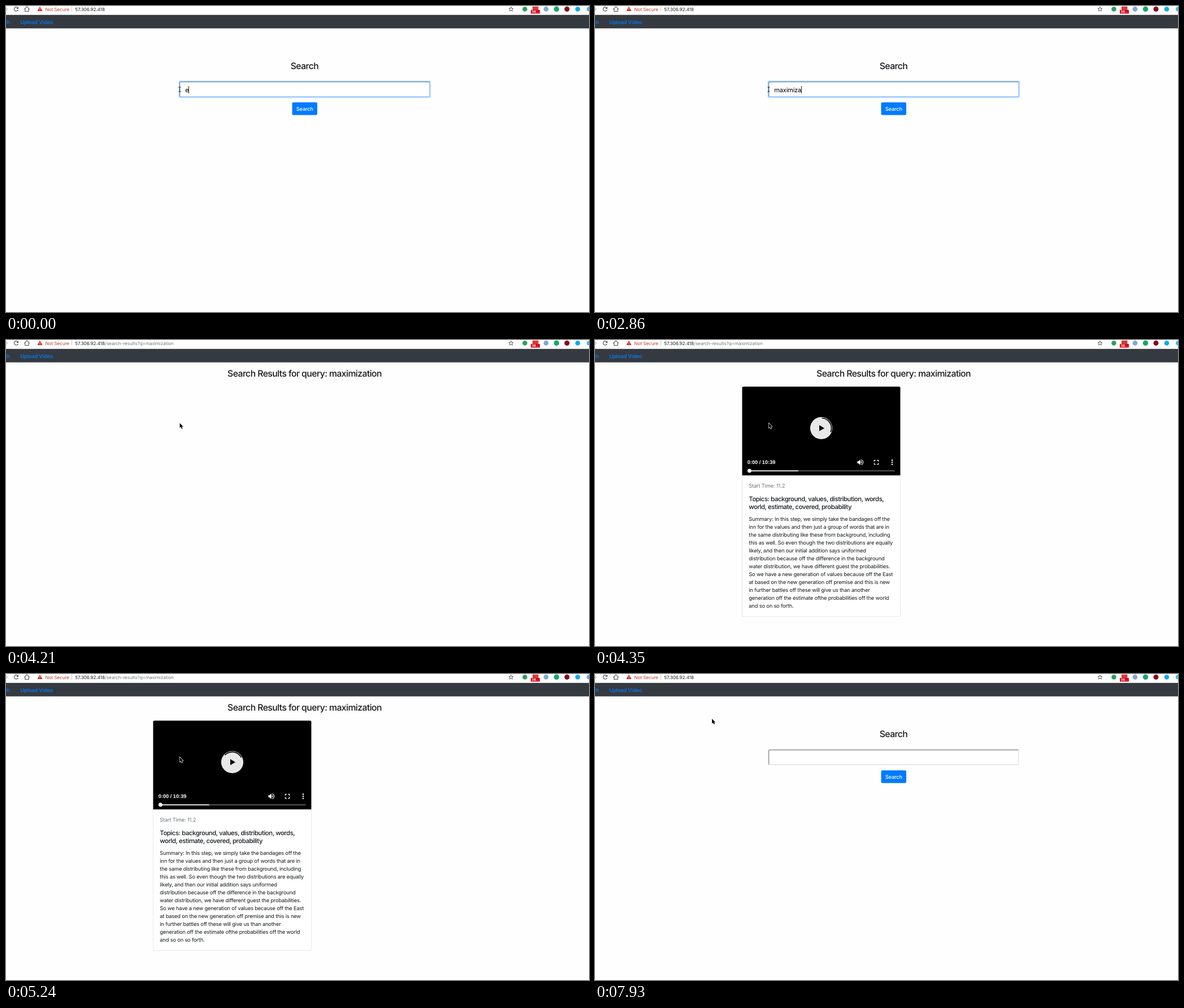
Recreate the animation shown at these times as an HTML page with a canvas. Size 1032 px wide and 543 px high, loop 8 s.

```html
<!DOCTYPE html>
<html lang="en">
<head>
<meta charset="utf-8">
<title>Video search</title>
<style>
  html, body { margin: 0; width: 100%; height: 100%; overflow: hidden; background: #fefefe; }
  canvas { display: block; width: 1032px; height: 543px; }
</style>
</head>
<body>
<canvas id="stage"></canvas>
<script>
const W = 1032, H = 543, LOOP = 8000;
const canvas = document.getElementById('stage');
const ctx = canvas.getContext('2d');
const dpr = window.devicePixelRatio || 1;
canvas.width = W * dpr;
canvas.height = H * dpr;

const HOST = '57.306.92.418';
const QUERY = 'maximization';
const BLUE = '#007bff', INK = '#16191c';

// Text styles: size, weight, tracking in em, family
const SANS = 'Inter, sans-serif';
const STYLE = {
  url: [8.17, 400, -0.009, SANS],
  nav: [9.33, 500, -0.02, SANS],
  body: [9.33, 400, -0.02, SANS],
  title: [15.8, 500, -0.037, SANS],
  topic: [11.32, 500, -0.037, SANS],
  input: [11.15, 400, -0.02, SANS],
  clock: [9.2, 700, 0, '"Liberation Sans", sans-serif'],
  badge: [5.8, 700, 0, SANS]
};

const SUMMARY = [
  'Summary: In this step, we simply take the bandages off the',
  'inn for the values and then just a group of words that are in',
  'the same distributing like these from background, including',
  'this as well. So even though the two distributions are equally',
  'likely, and then our initial addition says uniformed',
  'distribution because off the difference in the background',
  'water distribution, we have different guest the probabilities.',
  'So we have a new generation of values because off the East',
  'at based on the new generation off premise and this is new',
  'in further battles off these will give us than another',
  'generation off the estimate ofthe probabilities off the world',
  'and so on so forth.'
];

// [start ms, contents of the search field]
const TYPING = [
  [0, 'e'], [300, 'ex'], [780, 'e'], [930, ''], [1080, 'm'], [1230, 'ma'],
  [1370, 'mai'], [1520, 'maix'], [1810, 'mai'], [1960, 'ma'], [2110, 'max'],
  [2260, 'maxi'], [2560, 'maxim'], [2710, 'maximiz'], [2860, 'maximiza'],
  [3160, 'maximizati'], [3310, 'maximizatio'], [3760, QUERY]
];

// [start ms, x, y] of the arrow on the results page
const POINTER = [
  [4210, 307, 147], [5390, 174, 120], [5540, 41, 93], [5690, -40, 70],
  [5990, -1, 43], [6135, -2, 32], [6280, -40, 28]
];

const T_RESULTS = 4210, T_CARD = 4350, T_LOADED = 5390, T_HOVER = 6135, T_BACK = 7930;

function at(list, t) {
  let hit = list[0];
  for (const row of list) if (row[0] <= t) hit = row;
  return hit;
}

function text(str, x, y, style, color, align = 'left') {
  const [size, weight, track, family] = STYLE[style];
  ctx.font = `${weight} ${size}px ${family}`;
  ctx.letterSpacing = `${size * track}px`;
  ctx.textRendering = 'geometricPrecision';
  ctx.textAlign = align;
  ctx.fillStyle = color;
  ctx.fillText(str, x, y);
  return ctx.measureText(str).width;
}

function rect(x, y, w, h, color) {
  ctx.fillStyle = color;
  ctx.fillRect(x, y, w, h);
}

function round(x, y, w, h, r, color) {
  ctx.beginPath();
  ctx.roundRect(x, y, w, h, r);
  ctx.fillStyle = color;
  ctx.fill();
}

function disc(x, y, r, color) {
  ctx.beginPath();
  ctx.arc(x, y, r, 0, Math.PI * 2);
  ctx.fillStyle = color;
  ctx.fill();
}

function path(points, close) {
  ctx.beginPath();
  points.forEach(([x, y]) => ctx.lineTo(x, y));
  if (close) ctx.closePath();
}

function fillPath(points, color) {
  path(points, true);
  ctx.fillStyle = color;
  ctx.fill();
}

function stroke(color, width) {
  ctx.strokeStyle = color;
  ctx.lineWidth = width;
  ctx.stroke();
}

function toolbar(results) {
  const gray = '#4c4f53';
  rect(0, 0, W, 16, '#fff');

  path([[-1, 2], [2.5, 5.5], [-1, 9]]);
  stroke('#b8babd', 1.1);

  ctx.beginPath();
  ctx.arc(18, 5.5, 3.5, 0.35, 5.4);
  stroke(gray, 1.2);
  fillPath([[22, 1.2], [22, 5], [18.2, 5]], gray);

  path([[32.3, 5.8], [37, 1.2], [41.7, 5.8]]);
  stroke(gray, 1.1);
  path([[33.8, 5], [33.8, 9.5], [40.2, 9.5], [40.2, 5]]);
  stroke(gray, 1.1);

  fillPath([[60, 1], [64.5, 9], [55.5, 9]], '#c5281c');
  rect(59.5, 3.8, 1, 2.6, '#fff');
  rect(59.5, 7, 1, 1, '#fff');
  text('Not Secure', 69.5, 8.5, 'url', '#c5392b');
  rect(116, 1, 1, 9, '#c4c6c8');

  const w = text(HOST, 122.3, 8.5, 'url', '#202124');
  if (results) text('/search-results?q=' + QUERY, 122.3 + w, 8.5, 'url', '#72767b');

  const star = [];
  for (let i = 0; i < 10; i++) {
    const r = i % 2 ? 1.8 : 4.2, a = i * Math.PI / 5 - Math.PI / 2;
    star.push([894 + r * Math.cos(a), 5.8 + r * Math.sin(a)]);
  }
  path(star, true);
  stroke(gray, 0.9);

  disc(918.5, 5.5, 4.3, '#2c9f5c');
  rect(932, 1, 10.5, 7, '#d93a35');
  rect(929, 7, 16, 6.5, '#d5081c');
  text('38...', 937, 12.4, 'badge', '#fff', 'center');
  disc(956, 5.5, 4.4, '#82a8d3');
  disc(974.5, 5.5, 4.7, '#0fa968');
  disc(993, 5.5, 4.5, '#850b1b');
  disc(1012, 5.5, 4.3, '#10a9e8');
  disc(1032, 5.5, 4, '#45b8e8');
}

function navbar(hover) {
  rect(0, 15.4, W, 0.6, '#b6b6b6');
  rect(0, 16, W, 23.7, '#343a40');
  text('Search', 7, 31.5, 'nav', hover ? '#0056b3' : BLUE, 'right');
  text('Upload Video', 25.3, 31.5, 'nav', BLUE);
}

function field(focused) {
  const x = 307, y = 134, w = 443.5, h = 27.5;
  if (focused) round(x - 1.7, y - 1.7, w + 3.4, h + 3.4, 3.5, '#bfdeff');
  round(x, y, w, h, 2.3, focused ? '#80bdff' : '#dedede');

  // Inset border: darker on the top and left
  ctx.save();
  path([[x, y], [x + w, y], [x + w - 2, y + 2], [x + 2, y + h - 2], [x, y + h]], true);
  ctx.clip();
  round(x, y, w, h, 2.3, focused ? '#5686bd' : '#7d7d7d');
  ctx.restore();
  round(x + 1.2, y + 1.2, w - 2.4, h - 2.4, 1.4, '#fff');
}

function searchPage(t) {
  const focused = t < T_BACK;
  text('Search', 528.5, 111.6, 'title', INK, 'center');
  field(focused);
  if (focused) {
    const w = text(at(TYPING, t)[1], 317.2, 152.5, 'input', '#000');
    rect(Math.round(317 + w), 142, 1, 13, '#222');
  }
  round(506.5, 171, 44.5, 22.5, 2.3, BLUE);
  text('Search', 528.8, 185.9, 'nav', '#fff', 'center');
}

function player(t) {
  round(260.5, 82.7, 279.9, 157.6, [2, 2, 0, 0], '#000');
  const cx = 400.5, cy = 156.4;
  disc(cx, cy, 19.6, '#e8e8e8');
  fillPath([[397, 151], [406, 156.4], [397, 161.8]], '#000');

  if (t < T_LOADED) {
    const a = Math.round((t - 4504) / 147.2) * 0.9;
    ctx.beginPath();
    ctx.arc(cx, cy, 18, a - 0.6, a + 1.3);
    stroke('#000', 1.6);
  }

  text('0:00 / 10:39', 269.8, 220, 'clock', '#fff');

  fillPath([[464.5, 215], [466.7, 215], [469.7, 212], [469.7, 222], [466.7, 219], [464.5, 219]], '#fff');
  ctx.beginPath();
  ctx.arc(470.2, 217, 2.3, -1.3, 1.3);
  ctx.fillStyle = '#fff';
  ctx.fill();
  ctx.beginPath();
  ctx.arc(470, 217, 4.6, -1.25, 1.25);
  stroke('#fff', 1.1);

  for (const sx of [-1, 1]) for (const sy of [-1, 1]) {
    const x = 498 + sx * 3.6, y = 217 + sy * 3.6;
    path([[x - sx * 2.4, y], [x, y], [x, y - sy * 2.4]]);
    stroke('#fff', 1.2);
  }
  for (const dy of [-3.7, 0, 3.7]) disc(526, 217 + dy, 1.25, '#fff');

  round(270, 231, 261, 2.3, 1.1, '#4d4d4d');
  round(270, 231, 90, 2.3, 1.1, '#c4c4c4');
  disc(273.4, 232, 3.5, '#fff');
}

function resultsPage(t) {
  text('Search Results for query: ' + QUERY, 528.5, 65, 'title', INK, 'center');
  if (t < T_CARD) return;
  round(260.3, 82.7, 280.4, 408.3, 2.6, '#dfdfdf');
  round(261, 83.4, 279, 406.9, 2, '#fff');
  player(t);
  text('Start Time: 11.2', 272.3, 262.4, 'body', '#6c757d');
  text('Topics: background, values, distribution, words,', 272.3, 286.4, 'topic', INK);
  text('world, estimate, covered, probability', 272.3, 300.4, 'topic', INK);
  SUMMARY.forEach((line, i) => text(line, 272.3, 320.9 + i * 14, 'body', INK));
}

function arrow(x, y) {
  path([[0, 0], [0, 8.6], [2, 6.8], [3.4, 10], [4.9, 9.3], [3.5, 6.3], [6.1, 6.2]]
    .map(([dx, dy]) => [x + 0.6 + dx, y + 0.5 + dy]), true);
  ctx.lineJoin = 'round';
  stroke('#fff', 1.3);
  ctx.fillStyle = '#000';
  ctx.fill();
  ctx.lineJoin = 'miter';
}

function ibeam(x, y) {
  rect(x - 0.5, y - 4, 1, 8, '#222');
  rect(x - 2, y - 4.5, 4, 1, '#222');
  rect(x - 2, y + 3.5, 4, 1, '#222');
}

function draw(t) {
  const results = t >= T_RESULTS && t < T_BACK;
  ctx.setTransform(dpr, 0, 0, dpr, 0, 0);
  rect(0, 0, W, H, '#fefefe');
  toolbar(results);
  navbar(results && t >= T_HOVER);
  if (results) {
    resultsPage(t);
    const [, x, y] = at(POINTER, t);
    arrow(x, y);
  } else {
    searchPage(t);
    if (t < T_RESULTS) ibeam(307.5, 148);
    else arrow(206.5, 79);
  }
}

const start = performance.now();
function tick() {
  draw((performance.now() - start) % LOOP);
  requestAnimationFrame(tick);
}
tick();
</script>
</body>
</html>
```
